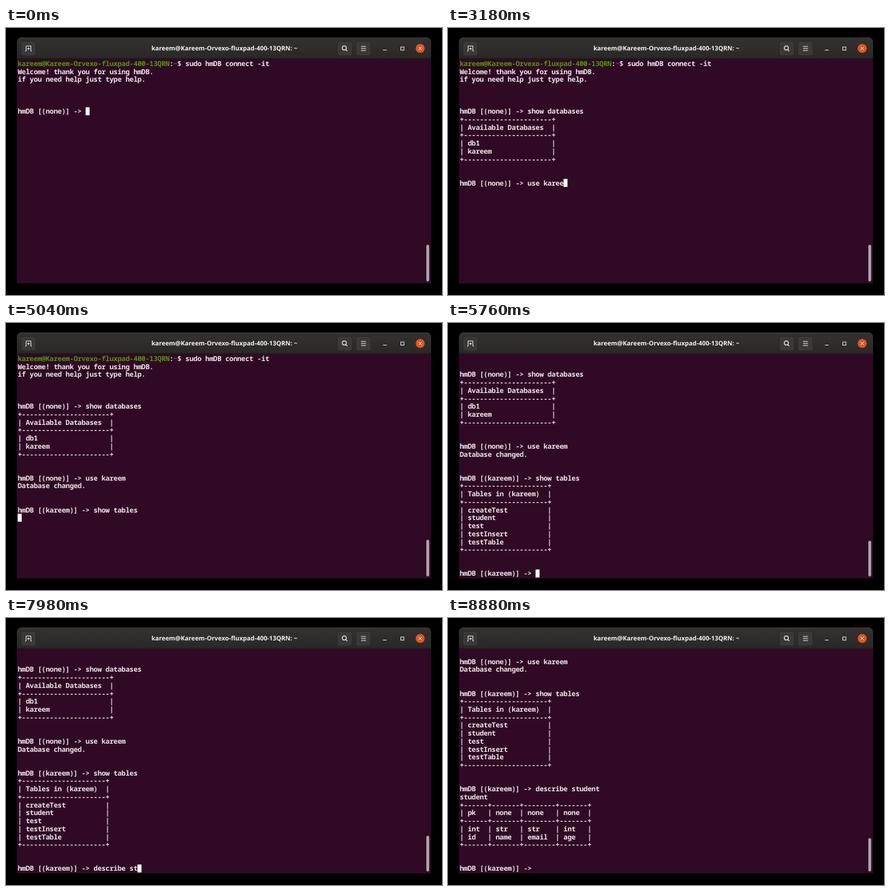
These frames come from a looping animation (640x393 px, 9000 ms). An HTML page with a canvas:

```html
<!DOCTYPE html>
<html lang="en">
<head>
<meta charset="utf-8">
<title>Terminal session</title>
<style>
  html, body { margin: 0; width: 100%; height: 100%; overflow: hidden; background: #000; }
  canvas { display: block; width: 640px; height: 393px; }
</style>
</head>
<body>
<canvas id="stage"></canvas>
<script>
const LOOP = 9000, TICK = 60;
const COL = 5.86, ROW = 11.72, LEFT = 17.2, TOP = 46.35, ROWS = 28;
const USER = 'kareem', HOST = 'Kareem-Orvexo-fluxpad-400-13QRN';
const LOGIN = USER + '@' + HOST;
const MONO = '10.2px "Noto Sans Mono", "DejaVu Sans Mono", monospace';

const canvas = document.getElementById('stage');
const ratio = window.devicePixelRatio || 1;
canvas.width = 640 * ratio;
canvas.height = 393 * ratio;
const ctx = canvas.getContext('2d');
ctx.scale(ratio, ratio);
ctx.textRendering = 'geometricPrecision';

// ---- session contents ----
const rule = widths => '+' + widths.map(w => '-'.repeat(w)).join('+') + '+\n';
const line = (cells, widths) =>
  '|' + cells.map((c, i) => (' ' + c).padEnd(widths[i])).join('|') + '|\n';
const table = (widths, head, rows) =>
  rule(widths) + line(head, widths) + rule(widths) +
  rows.map(r => line(r, widths)).join('') + rule(widths);

const prompt = db => `\n\nhmDB [(${db})] -> `;
const databases = table([22], ['Available Databases'], [['db1'], [USER]]);
const tables = table([21], [`Tables in (${USER})`],
  ['createTest', 'student', 'test', 'testInsert', 'testTable'].map(n => [n]));
const columns = table([6, 7, 8, 7], ['pk', 'none', 'none', 'none'],
  [['int', 'str', 'str', 'int'], ['id', 'name', 'email', 'age']]);

const INTRO = LOGIN + ':~$ sudo hmDB connect -it\n' +
  'Welcome! thank you for using hmDB.\n' +
  'if you need help just type help.\n\n' + prompt('none');

// ---- timeline: [time, text to print]; \b erases one character ----
const events = [];
const print = (time, text) => events.push([time, text]);

function type(from, to, text, steps = text.length) {
  const n = text.length;
  for (let i = 0; i < steps; i++) {
    const time = from + Math.round((to - from) * i / (steps - 1) / TICK) * TICK;
    print(time, text.slice(Math.round(n * i / steps), Math.round(n * (i + 1) / steps)));
  }
}

type(900, 1620, 'show databases', 11);
print(1800, '\n');
print(1860, databases + prompt('none'));
type(2520, 2700, 'use ', 3);
type(2880, 3180, USER.slice(0, 5), 4);
print(3300, USER.slice(5) + '\nDatabase changed.\n' + prompt(USER));
type(3840, 4200, 'show ta');
type(4320, 4380, '\b\b');
type(4680, 4980, 'tables');
print(5040, '\n');
print(5100, tables);
print(5160, prompt(USER));
type(6000, 6360, 'des');
type(7080, 7500, 'cribe ');
type(7920, 8040, 'stu');
type(8220, 8400, 'dent');
print(8520, '\n');
print(8580, 'student\n' + columns);
print(8640, prompt(USER));

const hidden = [[300, 660], [2100, 2460], [3660, 3840], [5400, 5760],
  [6720, 7020], [7860, 7920], [8880, LOOP]];

function textAt(time) {
  let text = INTRO;
  for (const [at, part] of events) {
    if (at > time) break;
    text = part === '\b' ? text.slice(0, -1) : text + part;
  }
  return text;
}

// ---- drawing ----
function box(x, y, w, h, r, fill) {
  ctx.beginPath();
  ctx.roundRect(x, y, w, h, r);
  ctx.fillStyle = fill;
  ctx.fill();
}

function stroke(color, width, ...paths) {
  ctx.strokeStyle = color;
  ctx.lineWidth = width;
  ctx.beginPath();
  for (const [x, y, ...rest] of paths) {
    ctx.moveTo(x, y);
    for (let i = 0; i < rest.length; i += 2) ctx.lineTo(rest[i], rest[i + 1]);
  }
  ctx.stroke();
}

function button(x) {
  box(x, 19.5, 22.5, 21.5, 3, '#242322');
  box(x + 0.6, 20.1, 21.3, 20.3, 2.6, '#3b3938');
}

function drawHeader() {
  const shade = ctx.createLinearGradient(0, 14, 0, 45);
  shade.addColorStop(0, '#343231');
  shade.addColorStop(1, '#2a2827');
  box(16, 14, 608, 31.5, [6, 6, 0, 0], shade);
  stroke('#454342', 0.8, [21, 14.5, 619, 14.5]);
  stroke('#191717', 1, [16, 45, 624, 45]);

  [21.5, 486, 513.5].forEach(button);
  const ink = '#e2e0df';
  stroke(ink, 1, [28, 34, 29.5, 34, 29.5, 26.5, 36.5, 26.5, 36.5, 34, 38, 34],
    [31, 30.5, 35, 30.5], [33, 28.5, 33, 32.5]);
  stroke(ink, 1.2, [498.6, 31.6, 501, 34]);
  ctx.beginPath();
  ctx.arc(496.6, 29.4, 3, 0, Math.PI * 2);
  ctx.stroke();
  stroke(ink, 1, [521.2, 27.2, 528.4, 27.2], [521.2, 30.2, 528.4, 30.2], [521.2, 33.2, 528.4, 33.2]);
  stroke(ink, 1, [553.4, 32.5, 558.6, 32.5]);
  ctx.strokeRect(579.5, 28, 4.6, 4.6);

  box(601.4, 23.4, 13.2, 13.2, 6.6, '#e95420');
  stroke('#fff', 1, [606, 28, 610, 32], [610, 28, 606, 32]);

  ctx.font = '700 9.15px "Open Sans", "Noto Sans", sans-serif';
  ctx.textAlign = 'center';
  ctx.fillStyle = '#f4f2f1';
  ctx.fillText(LOGIN + ': ~', 320.5, 33.4);
}

function drawText(text, cursorOn) {
  const lines = text.split('\n');
  const last = lines.length - 1;
  const scroll = Math.max(0, lines.length - ROWS);
  ctx.textAlign = 'left';
  for (let n = scroll; n <= last; n++) {
    const y = TOP + (n - scroll) * ROW + 9.6;
    [...lines[n]].forEach((ch, c) => {
      const user = n === 0 && c < LOGIN.length;
      const path = n === 0 && c === LOGIN.length + 1;
      ctx.font = (user || path ? '700 ' : '600 ') + MONO;
      ctx.fillStyle = user ? '#4e9a06' : path ? '#4a6fae' : '#ebe7e9';
      if (ch !== ' ') ctx.fillText(ch, LEFT + c * COL, y);
    });
  }
  if (cursorOn) {
    ctx.fillStyle = '#fff';
    ctx.fillRect(LEFT + lines[last].length * COL, TOP + (last - scroll) * ROW, COL, ROW);
  }
  const thumb = 319 + scroll * 0.36;
  box(617, thumb, 4.2, 373.2 - thumb, 2.1, '#aca4a9');
}

function draw(time) {
  ctx.fillStyle = '#000';
  ctx.fillRect(0, 0, 640, 393);
  box(16, 45, 608, 331, 0, '#300a24');
  drawHeader();
  drawText(textAt(time), !hidden.some(([a, b]) => time >= a && time < b));
}

const start = performance.now();
function frame() {
  draw((performance.now() - start) % LOOP);
  requestAnimationFrame(frame);
}
frame();
</script>
</body>
</html>
```
